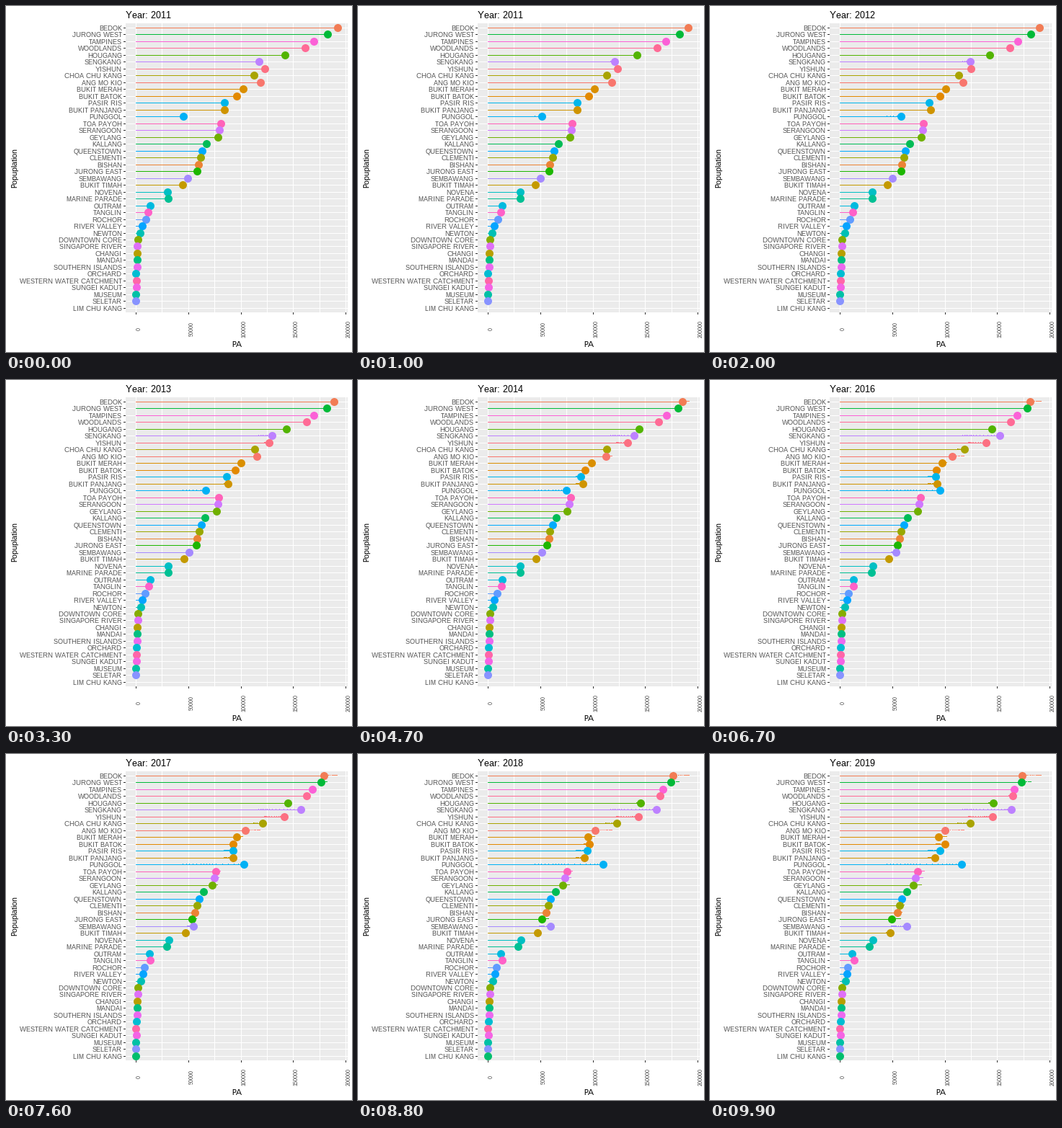
Animation, 480 px wide and 480 px high, one loop 10000 ms. Source, as a matplotlib script:

```python
import numpy as np
import matplotlib.pyplot as plt
from matplotlib.animation import FuncAnimation
from matplotlib.collections import LineCollection
from matplotlib.patches import Rectangle

# Grid-fitted, unkerned text
plt.rcParams.update({
    "font.family": "Liberation Sans",
    "text.hinting": "default",
    "text.hinting_factor": 1,
    "text.kerning_factor": 6,
})

FRAMES, LAST, SIZE = 100, 99, 480
PT = 0.75  # points per pixel at 96 dpi
LEFT, RIGHT, TOP, BOTTOM = 166, 474, 24, 425

# Population in thousands at evenly spaced years from 2011 to 2019.
AREAS = {
    "BEDOK": (192.2, 190.8, 189.6, 188.1, 184.8, 182.4, 179.6, 176.7, 173.8),
    "JURONG WEST": (182.8, 182.2, 181.5, 177, 172.8),
    "TAMPINES": (170, 169.2, 170.4, 168.7, 166),
    "WOODLANDS": (161.1, 162.3, 163, 162.6, 165),
    "HOUGANG": (141.9, 144.3, 146),
    "SENGKANG": (117.8, 121.6, 125.7, 131.5, 141.5, 149, 156.9, 160.7, 163.8),
    "YISHUN": (123.3, 124, 125.2, 128.4, 135, 138.4, 140.9, 143.5, 145.9),
    "CHOA CHU KANG": (113, 113.3, 113.3, 120.9, 124.6),
    "ANG MO KIO": (119.1, 116.7, 112.2, 104.9, 100.6),
    "BUKIT MERAH": (102.7, 98.9, 94.4),
    "BUKIT BATOK": (96.5, 95.4, 92.7, 92.3, 100.6),
    "PASIR RIS": (84.8, 85.7, 88.8, 92.9, 95.8),
    "BUKIT PANJANG": (84.8, 86.7, 91.4, 93.1, 91),
    "PUNGGOL": (45.7, 52.9, 62.5, 69, 76.9, 91.4, 101.6, 109.2, 116.4),
    "TOA PAYOH": (80.9, 78.6, 74.5),
    "SERANGOON": (80, 77.2, 72.5),
    "GEYLANG": (78.7, 75.8, 70.4),
    "KALLANG": (67.7, 65.3, 64.2),
    "QUEENSTOWN": (63.5, 61.9, 59.4),
    "CLEMENTI": (62.2, 59.2, 57.4),
    "BISHAN": (59.7, 58.2, 55.3),
    "JURONG EAST": (58.8, 58, 56.5, 54, 49.8),
    "SEMBAWANG": (49.8, 50.2, 51.8, 54, 64.2),
    "BUKIT TIMAH": (45, 48),
    "NOVENA": (30.6, 31.9),
    "MARINE PARADE": (31.3, 30.8, 28.6),
    "OUTRAM": (14.1, 14.2, 12.1),
    "TANGLIN": (12, 14),
    "ROCHOR": (10, 8),
    "RIVER VALLEY": (6, 7),
    "NEWTON": (4.5, 5.3),
    "DOWNTOWN CORE": (2.5, 1.9),
    "SINGAPORE RIVER": (1.8, 2.5),
    "CHANGI": (1.8, 1.2),
    "MANDAI": (1.4, 1.2),
    "SOUTHERN ISLANDS": (1.2, 1.6),
    "ORCHARD": (0.4, 0.9),
    "WESTERN WATER CATCHMENT": (0.9, 0.3),
    "SUNGEI KADUT": (0.5,),
    "MUSEUM": (0.3,),
    "SELETAR": (0.2,),
    "LIM CHU KANG": (0.1,),
}
NAMES = list(AREAS)
N = len(NAMES)
LATE_START = 74  # the last area has no data before 2017


def px(thousands):
    """Pixel column of a population value."""
    return np.floor(180.3 + 1.457 * np.asarray(thousands))


def hcl(hue, chroma=100, lum=65):
    """Polar LUV colour as sRGB."""
    h = np.radians(hue)
    y = ((lum + 16) / 116) ** 3
    u = chroma * np.cos(h) / (13 * lum) + 0.1978
    v = chroma * np.sin(h) / (13 * lum) + 0.4683
    x = 9 * y * u / (4 * v)
    z = -x / 3 - 5 * y + 3 * y / v
    lin = np.array([
        3.240479 * x - 1.537150 * y - 0.498535 * z,
        -0.969256 * x + 1.875992 * y + 0.041556 * z,
        0.055648 * x - 0.204043 * y + 1.057311 * z,
    ])
    lin = np.clip(lin, 0, 1)
    return tuple(np.where(lin > 0.00304, 1.055 * lin ** (1 / 2.4) - 0.055, 12.92 * lin))


def track(values):
    keys = np.round(np.linspace(0, LAST, len(values)))
    return px(np.interp(np.arange(FRAMES), keys, values))


rank = {name: i for i, name in enumerate(sorted(NAMES))}
colors = np.array([hcl(15 + 360 * rank[name] / N) for name in NAMES])
rows = np.floor(30.3 + 9.49 * np.arange(N))
xs = np.array([track(AREAS[name]) for name in NAMES])

fig = plt.figure(figsize=(5, 5), dpi=96, facecolor="white")
ax = fig.add_axes([0, 0, 1, 1])
ax.set_xlim(0, SIZE)
ax.set_ylim(SIZE, 0)
ax.axis("off")


def lines(segs, color, z):
    """One-pixel crisp lines."""
    art = LineCollection(segs, colors=color, linewidths=PT, antialiaseds=False,
                         capstyle="butt", zorder=z)
    art.set_snap(False)
    return ax.add_collection(art, autolim=False)


def dots(diameter, marker, z):
    return ax.scatter([], [], s=(diameter * PT) ** 2, marker=marker,
                      linewidths=0, snap=False, zorder=z)


def label(x, y, text, size, color="black", **kw):
    kw = {"ha": "center", "va": "baseline", **kw}
    return ax.text(x, y, text, fontsize=size * PT, color=color, **kw)


def hline(x0, x1, y):
    return [(x0, y + 0.5), (x1, y + 0.5)]


def vline(x, y0, y1):
    return [(x + 0.5, y0), (x + 0.5, y1)]


# Static panel, grid, ticks and labels
ax.add_patch(Rectangle((LEFT, TOP), RIGHT - LEFT, BOTTOM - TOP, fc="#EBEBEB",
                       lw=0, antialiased=False, zorder=0))
ticks = np.arange(0, 201, 50)
grid = [vline(px(v), TOP, BOTTOM) for v in range(0, 201, 25)]
grid += [hline(LEFT, RIGHT, y) for y in rows]
lines(grid, "white", 1)
marks = [vline(px(v), BOTTOM, BOTTOM + 3) for v in ticks]
marks += [hline(LEFT - 3, LEFT, y) for y in rows]
lines(marks, "#333333", 1)

upright = dict(rotation=90, rotation_mode="anchor")
for name, y in zip(NAMES, rows):
    label(161, y + 4, name, 9, "#4D4D4D", ha="right")
for v in ticks:
    label(px(v) + 7, 448.5, str(v * 1000), 8, "#4D4D4D", **upright)
label(320, 473, "PA", 11)
label(15, 225, "Popuplation", 11, **upright)
title = label(LEFT, 17, "", 13, ha="left")

stems = lines([], colors, 2)
trail = dots(1, "s", 3)
heads = dots(11, "o", 4)


def update(i):
    n = N if i >= LATE_START else N - 1
    title.set_text(f"Year: {2011 + 8 * i // LAST}")

    stems.set_segments([hline(px(0), x, y) for x, y in zip(xs[:n, i], rows)])
    heads.set_offsets(np.column_stack([xs[:n, i], rows[:n]]) + 0.5)
    heads.set_facecolor(colors[:n])

    # Specks left behind just above the line, one every five steps
    past = np.arange(0, i, 5)
    k = len(past)
    spots = np.column_stack([xs[:N - 1, past].ravel(), np.repeat(rows[:N - 1], k)])
    trail.set_offsets(spots - 0.5)
    trail.set_facecolor(np.repeat(colors[:N - 1], k, axis=0))
    return title, stems, trail, heads


anim = FuncAnimation(fig, update, frames=FRAMES, interval=100,
                     repeat=True, repeat_delay=0, blit=False)
plt.show()
```
